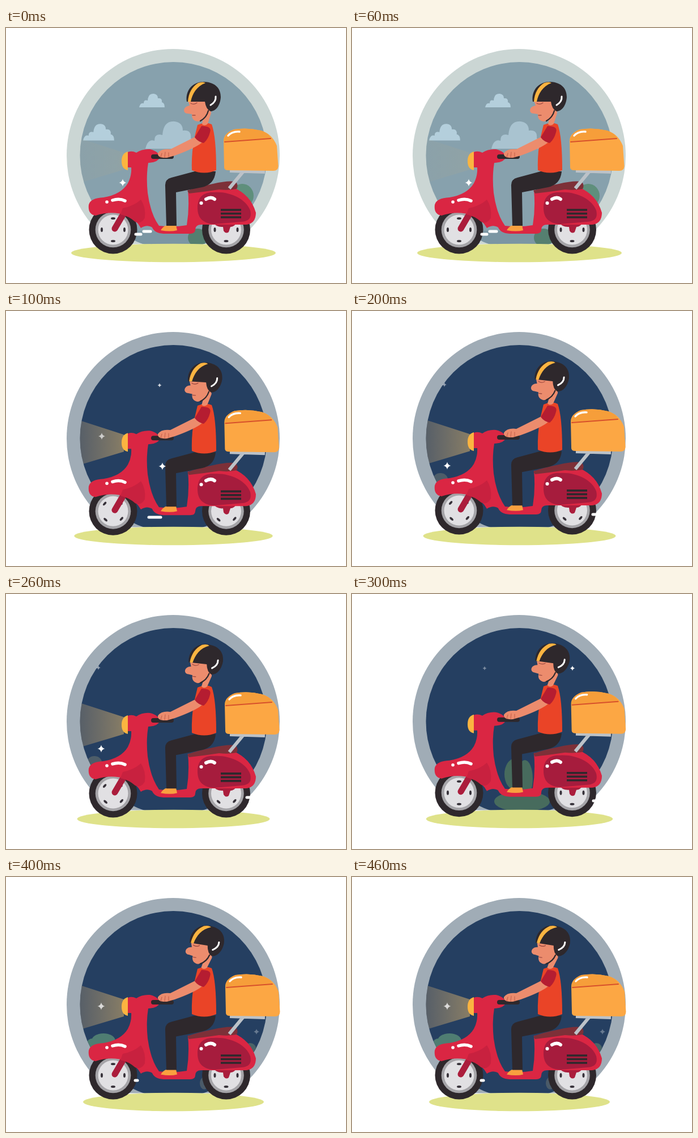
These frames come from a looping animation (600 by 450 pixels, 500 ms). An HTML page:

```html
<!DOCTYPE html>
<html lang="en">
<head>
<meta charset="utf-8">
<title>Scooter delivery</title>
<style>
html, body { margin: 0; width: 100%; height: 100%; overflow: hidden; background: #fff; }
svg { display: block; width: 100%; height: 100%; }
.line { fill: none; stroke-linecap: round; stroke-linejoin: round; }
</style>
</head>
<body>
<svg viewBox="0 0 600 450">
  <defs>
    <clipPath id="horizon"><rect width="600" height="381.5"/></clipPath>
    <clipPath id="window"><circle cx="295.5" cy="225" r="165"/></clipPath>
    <linearGradient id="glow">
      <stop offset="0" stop-color="#c9a878" stop-opacity=".3"/>
      <stop offset="1" stop-color="#d9b068" stop-opacity=".55"/>
    </linearGradient>
    <g id="wheel">
      <circle r="42.5" fill="#2e282c"/>
      <circle r="31.3" fill="#a5a4a8"/>
      <circle r="26.5" fill="#e1e0e3"/>
      <g class="bolts" fill="#37323a">
        <ellipse cx="-20" rx="2" ry="4"/><ellipse cx="20" rx="2" ry="4"/>
        <ellipse cy="-20" rx="4" ry="2"/><ellipse cy="20" rx="4" ry="2"/>
      </g>
    </g>
  </defs>

  <g clip-path="url(#horizon)">
    <circle id="ring" cx="295" cy="225" r="188"/>
    <circle id="sky" cx="295.5" cy="225" r="165"/>
    <g clip-path="url(#window)">
      <g id="scenery"></g>
      <path id="beam" d="M208 220L128 194V274L208 250Z" fill="url(#glow)"/>
    </g>
  </g>
  <ellipse id="ground" cx="295.5" cy="397" ry="16.3" fill="#dfe28a"/>

  <g id="wheels">
    <use href="#wheel" x="189" y="356"/>
    <use href="#wheel" x="388.5" y="356"/>
  </g>

  <g id="bike">
    <path class="line" d="M192 354L206 330" stroke="#ab1d3c" stroke-width="11"/>
    <path d="M366 343H407Q403 351 396 351L393 360Q388 364 384 358L383 351Q371 352 366 343Z" fill="#ab1d3c"/>
    <path d="M215 219Q222 216 230 220Q240 213 254 214Q271 218 271 229Q268 237 251 238Q247 262 250 291Q255 328 270 349Q296 352 319 348Q324 318 321 286L400 281Q432 294 441 326Q441 345 424 347H345Q334 347 334 356Q334 363 325 363H278Q262 362 258 352Q249 346 238 353Q230 338 212 330Q184 322 158 331Q144 329 146 312Q149 300 172 299Q203 294 215 274Q222 261 221 246H215Z" fill="#da2643"/>
    <path d="M206 318Q226 314 238 303Q247 316 245 335Q238 347 228 342Q217 332 202 329Z" fill="#c8213f"/>
    <path d="M320 287Q335 281 365 275Q390 269 405 271Q411 277 407 284Q392 287 376 285Q350 289 323 292Z" fill="#7d3038"/>
    <path d="M395 252L457 254M394 283L418 254" fill="none" stroke="#bcc2c8" stroke-width="6"/>
    <path d="M338 317C338 298 349 289 367 290C395 288 424 302 431 322C434 335 429 341 415 342L368 346C346 345 338 334 338 317Z" fill="#a61c3d"/>
    <path d="M379 321H415M379 327.5H415M379 334H415" stroke="#2e282c" stroke-width="3.6"/>
    <g class="line" stroke="#fff" stroke-width="5.5">
      <path d="M178 307h.1M188 304Q200 300 210 305"/>
      <path d="M344.5 309h.1M353 302Q362 297 368 302" stroke-width="6"/>
    </g>
    <path d="M215 218Q204 221 204 235Q204 249 215 251Z" fill="#fbb441"/>
    <path class="line" d="M260 227H292" stroke="#2e282c" stroke-width="8"/>
  </g>

  <g id="box">
    <path d="M384 199Q384 186 402 179Q426 175 450 181Q470 187 478 208L480.5 244Q480 252 472 252L392 251Q385 251 385 246Z" fill="#fca744"/>
    <path d="M384.500 200Q385 186 402 179Q426 175 450 181Q463 185 468 195Z" fill="#f69e3a"/>
    <path class="line" d="M386 201L467 195" stroke="#d7502b" stroke-width="2"/>
    <path class="line" d="M392 190Q399 182 412 183" stroke="#fff" stroke-width="3.4"/>
  </g>

  <g id="legs">
    <path d="M273 357Q277 350 284 348H300L302 357Q290 360 273 357Z" fill="#f9a03f"/>
    <path d="M333 253L292 264Q280 267 281 279L283 349H301L300 290L346 281Q368 276 370 253Z" fill="#2e282c"/>
  </g>

  <g id="torso">
    <path d="M338 171Q352 165 363 170Q371 192 371 251Q350 260 328 251Q327 222 332 196Z" fill="#ea4427"/>
    <path d="M334 192L290 214Q274 212 268 221Q267 230 284 229L298 225Q334 212 346 202Z" fill="#ec8c6d"/>
    <path class="line" d="M275 221L273 228M281 219L280 228M287 220V227" stroke="#c9644f" stroke-width="1.2"/>
    <path d="M345 173Q364 173 360 184Q357 196 349 203Q339 201 333 193Z" fill="#b51d31"/>
  </g>

  <g id="head">
    <path d="M321 128L324 137C312 138 311 151 321 151L328 152Q327 163 338 165Q345 164 348 159L346 170Q351 174 356 169L362 150L358 125Z" fill="#ec8c6d"/>
    <path class="line" d="M326 133Q332 136 337 132M329 154h5" stroke="#a14c42" stroke-width="1.3"/>
    <path d="M319 130C316 111 329 94 350 95C371 96 379 108 379 122C378 137 370 147 361 147Q353 144 351 130Z" fill="#2e282c"/>
    <path d="M339 97Q348 94 352 97C336 103 329 116 326 130H321C322 115 328 104 339 97Z" fill="#fbb441"/>
    <path class="line" d="M357 146Q354 158 343 164" stroke="#2e282c" stroke-width="2.2"/>
    <path class="line" d="M370 121Q371 130 361 136" stroke="#fff" stroke-width="3"/>
  </g>

  <g id="lights"></g>
</svg>

<script>
const STEP = 100;
const el = id => document.getElementById(id);
const setAll = (id, attrs) => {
  for (const name in attrs) el(id).setAttribute(name, attrs[name]);
};

const ellipse = (x, y, rx, ry, fill) =>
  `<ellipse cx="${x}" cy="${y}" rx="${rx}" ry="${ry}" fill="${fill}"/>`;
const star = (x, y, r, alpha = 1) =>
  `<path transform="translate(${x} ${y}) scale(${r})" fill="#fff" opacity="${alpha}"
    d="M0-1Q.18-.18 1 0Q.18.18 0 1Q-.18.18-1 0Q-.18-.18 0-1Z"/>`;
const dash = (x, y, length) =>
  `<path class="line" d="M${x} ${y}h${length}" stroke="#fff" stroke-width="5"/>`;
const cloud = (x, y, scale, alpha) =>
  `<path transform="translate(${x} ${y}) scale(${scale})" fill="#b4cfdc" opacity="${alpha}"
    d="M0 25Q2 16 8 18Q8 11 15 13Q16 0 26 1Q33 2 33 9Q41 8 40 16Q45 17 45 25Z"/>`;

const scenes = [
  {
    beam: .2,
    scenery: cloud(235, 115, 1, 1) + cloud(136, 168, 1.22, 1) + cloud(246, 163, 2, .75) +
      '<path d="M225 358H365V382H225Z" fill="#7b96a3"/>' +
      ellipse(417, 296, 20, 21, '#5f8f7c') + ellipse(338, 370, 17, 16, '#557f70'),
    lights: star(206, 273, 6.5) + dash(229, 364, 9) + dash(243, 359, 12),
  },
  {
    beam: 1,
    scenery: '',
    lights: star(271, 131, 3.5, .8) + star(169, 221, 6, .65) + star(276, 274, 6.5) + dash(252, 364, 21),
  },
  {
    beam: 1,
    scenery: ellipse(156, 297, 13, 11, '#4d5d69'),
    lights: star(163, 130, 4, .5) + star(168, 273, 6.5) + dash(425, 359, 8),
  },
  {
    beam: 0,
    scenery: ellipse(288, 318, 19, 28, '#476b5d') + ellipse(305, 326, 14, 33, '#476b5d') +
      ellipse(300, 366, 49, 18, '#476b5d'),
    lights: star(234, 131, 3.5, .4) + star(389, 131, 4.5) + dash(426, 365, 4),
  },
  {
    beam: 1,
    scenery: ellipse(172, 289, 21, 13, '#4f7d72') + ellipse(153, 293, 10, 8, '#4f7d72') +
      ellipse(431, 302, 10, 9, '#4a6468') + ellipse(350, 364, 8, 11, '#4a5a68'),
    lights: star(168, 228, 6.5, .75) + star(442, 273, 5, .3) + dash(228, 359, 4),
  },
];

// Shift and tilt of each part at the top of the bounce: [x, y, degrees].
const travel = {
  wheels: [0, -6, 0], bike: [0, -6, 0], box: [3, -6, 0],
  legs: [0, -8.5, 0], torso: [0, -9, 0], head: [6, -9, 9],
};
const lift = [0, .44, .68, .88, 1];

function draw(i) {
  const scene = scenes[i], day = i === 0, k = lift[i];
  setAll('ring', { fill: day ? '#cbd6d4' : '#a0acb6' });
  setAll('sky', { fill: day ? '#87a1ad' : '#253f61' });
  setAll('ground', { rx: 180.5 - 5.25 * i });
  setAll('beam', { opacity: scene.beam, transform: `translate(0 ${-4 * k})` });
  el('scenery').innerHTML = scene.scenery;
  el('lights').innerHTML = scene.lights;
  for (const id in travel) {
    const [x, y, tilt] = travel[id];
    setAll(id, { transform: `translate(${x * k} ${y * k}) rotate(${tilt * k} 350 122)` });
  }
  const turn = i === 1 || i === 2 ? 42 : 0;
  document.querySelector('.bolts').setAttribute('transform', `rotate(${turn})`);
}

let shown = -1;
function tick() {
  const i = Math.floor(performance.now() / STEP) % scenes.length;
  if (i !== shown) draw(shown = i);
  requestAnimationFrame(tick);
}
tick();
</script>
</body>
</html>
```
